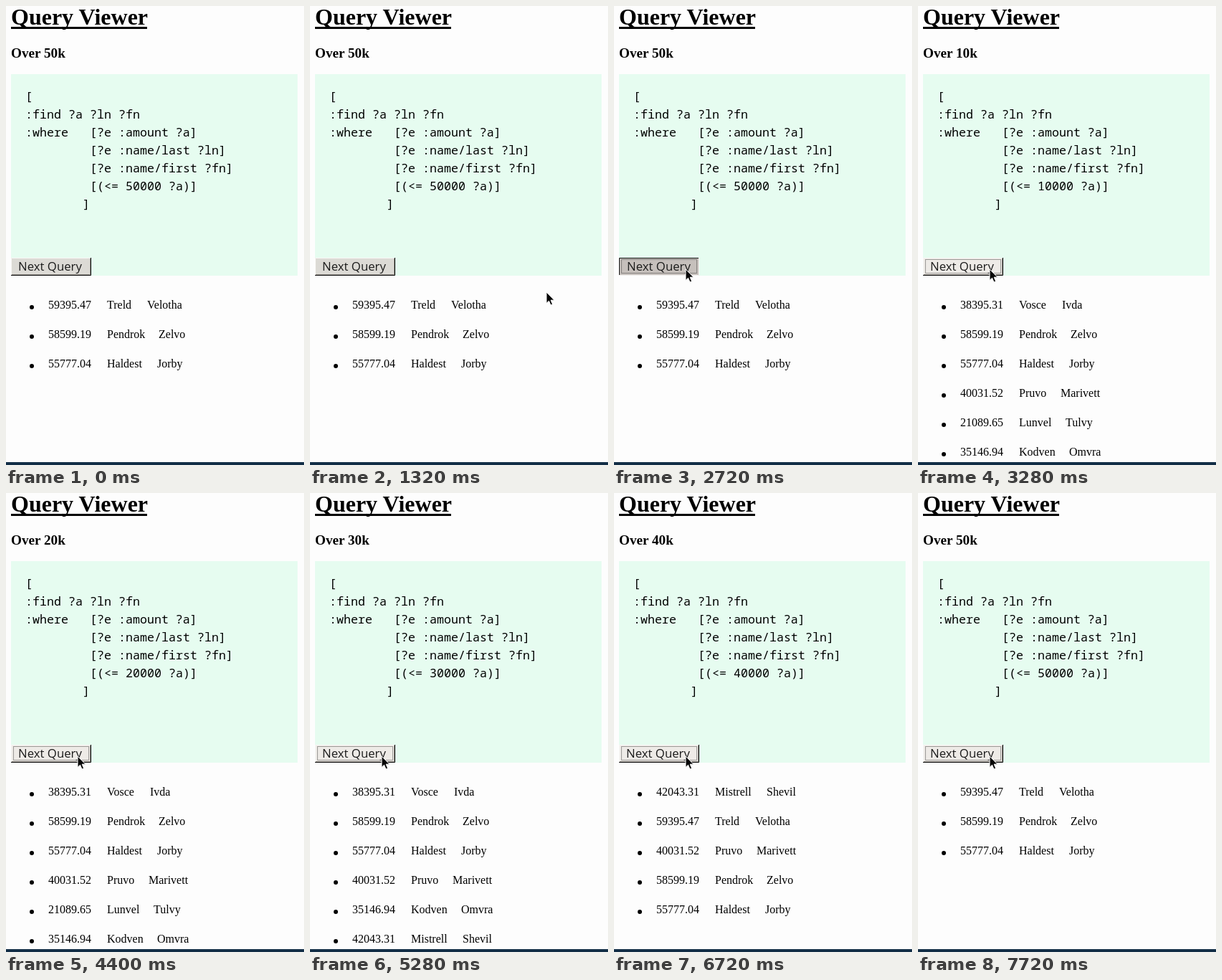
These frames come from a looping animation (416 by 640 pixels, 8 s). An HTML page:

```html
<!DOCTYPE html>
<html lang="en">
<head>
<meta charset="utf-8">
<title>Query Viewer</title>
<style>
  html, body { margin: 0; width: 100%; height: 100%; overflow: hidden; background: #fdfdfd; }
  svg { display: block; width: 416px; height: 640px; }
  text { white-space: pre; }
  .serif { font-family: "Liberation Serif", serif; font-size: 16px; }
  .title { font-size: 32px; font-weight: bold; }
  .heading { font-size: 19.2px; font-weight: bold; }
  .code { font: 500 16.667px "Noto Sans Mono", monospace; font-variant-ligatures: none; }
  .label { font: 16.8px "Open Sans", sans-serif; fill: #1c1c1c; }
  .bevel { fill: none; }
</style>
</head>
<body>
<svg viewBox="0 0 416 640">
  <rect width="416" height="640" fill="#fdfdfd"/>
  <text class="serif title" x="7" y="26">Query Viewer</text>
  <rect x="7" y="29" width="190" height="3"/>
  <text id="heading" class="serif heading" x="7" y="72"></text>

  <rect x="7" y="95" width="400" height="281" fill="#e6fcf0"/>
  <g id="code" class="code"></g>

  <g id="button">
    <rect id="face" x="7" y="351" width="112" height="25"/>
    <path id="topLeft" class="bevel" d="M7.5 375V351.5H118"/>
    <path id="innerEdge" class="bevel" d="M8 374.5H117.5V352"/>
    <path id="bottomRight" class="bevel" d="M7 375.5H118.5V351"/>
    <rect id="focus" x="10.5" y="353.5" width="105" height="19" fill="none" stroke="#4a4846" stroke-dasharray="1 1"/>
    <text id="label" class="label" x="17" y="369">Next Query</text>
  </g>

  <g id="list" class="serif"></g>
  <rect y="636" width="416" height="4" fill="#122e46"/>
  <path id="cursor" d="M0 0V15.5L3.5 12.2L6 18L8.6 16.9L6.2 11.2H11Z" fill="#060606" stroke="#fff"/>
</svg>
<script>
const LOOP = 8000;
const $ = id => document.getElementById(id);

// amount, last name, first name, x of the first name
const people = {
  treld:    ["59395.47", "Treld", "Velotha", 197],
  pendrok:  ["58599.19", "Pendrok", "Zelvo", 213],
  haldest:  ["55777.04", "Haldest", "Jorby", 211],
  vosce:    ["38395.31", "Vosce", "Ivda", 201],
  pruvo:    ["40031.52", "Pruvo", "Marivett", 199],
  lunvel:   ["21089.65", "Lunvel", "Tulvy", 206],
  kodven:   ["35146.94", "Kodven", "Omvra", 211],
  mistrell: ["42043.31", "Mistrell", "Shevil", 213],
};
const lowRows = "vosce pendrok haldest pruvo lunvel kodven";
const topRows = "treld pendrok haldest";

const queries = [
  { from: 0,    limit: 50, rows: topRows },
  { from: 3160, limit: 10, rows: lowRows },
  { from: 4280, limit: 20, rows: lowRows },
  { from: 5200, limit: 30, rows: "vosce pendrok haldest pruvo kodven mistrell" },
  { from: 6160, limit: 40, rows: "mistrell treld pruvo pendrok haldest" },
  { from: 7080, limit: 50, rows: topRows },
];
const presses = [[2600, 2840], [4000, 4160], [5040, 5160], [5960, 6120], [6760, 6920]];

const text = (x, y, content) => `<text x="${x}" y="${y}">${content}</text>`;

function codeMarkup(limit) {
  const indent = " ".repeat(9);
  return [
    "[",
    ":find ?a ?ln ?fn",
    ":where   [?e :amount ?a]",
    indent + "[?e :name/last ?ln]",
    indent + "[?e :name/first ?fn]",
    indent + `[(&lt;= ${limit}000 ?a)]`,
    " ".repeat(8) + "]",
  ].map((line, i) => {
    const code = line.trimStart();
    return text(27 + 10 * (line.length - code.length), 132 + 25 * i, code);
  }).join("");
}

function listMarkup(rows) {
  return rows.split(" ").map((key, i) => {
    const [amount, last, first, firstX] = people[key];
    const y = 422 + 41 * i;
    return `<circle cx="36" cy="${y - 2}" r="3"/>`
      + text(59, y, amount) + text(141, y, last) + text(firstX, y, first);
  }).join("");
}

let shown;
function showQuery(query) {
  if (query === shown) return;
  shown = query;
  $("heading").textContent = `Over ${query.limit}k`;
  $("code").innerHTML = codeMarkup(query.limit);
  $("list").innerHTML = listMarkup(query.rows);
}

function showButton(pressed, hovered, focused) {
  const paint = (id, color) => $(id).setAttribute("stroke", color);
  $("face").setAttribute("fill", pressed ? "#c6c0bc" : hovered ? "#eeebe7" : "#dcdad5");
  paint("topLeft", pressed ? "#141414" : "#f8f7f5");
  paint("innerEdge", pressed ? "#c6c0bc" : "#96928c");
  paint("bottomRight", pressed ? "#f4f2f0" : "#0a0a0a");
  $("focus").style.display = focused ? "" : "none";
  $("label").setAttribute("x", pressed ? 18 : 17);
}

function draw(t) {
  showQuery(queries.findLast(query => t >= query.from));

  const progress = Math.min(1, Math.max(0, (t - 1200) / 960));
  const remaining = (1 - progress) ** 2.45;
  const x = Math.round(100 + 320 * remaining);
  const y = Math.round(367 + 44 * remaining);
  $("cursor").setAttribute("transform", `translate(${x} ${y})`);
  $("cursor").style.display = t < 1240 ? "none" : "";

  const pressed = presses.some(([down, up]) => t >= down && t < up);
  showButton(pressed, x < 119, t >= presses[0][0]);
}

function tick() {
  draw(performance.now() % LOOP);
  requestAnimationFrame(tick);
}
tick();
</script>
</body>
</html>
```
